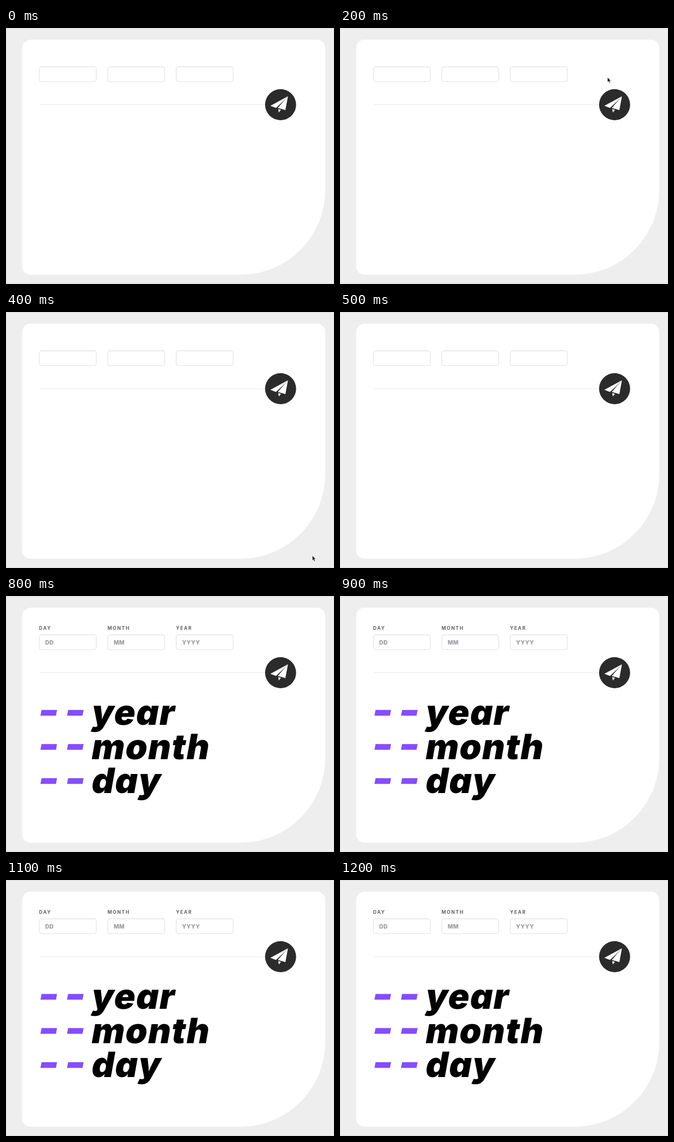
An HTML page for the animation above (1.3 s loop, 600x469 px).

```html
<!DOCTYPE html>
<html lang="en">
<head>
<meta charset="utf-8">
<title>Age calculator</title>
<style>
  html, body { margin: 0; width: 100%; height: 100%; overflow: hidden; background: #eeeeef; }
  svg { display: block; width: 600px; height: 469px; font-family: Inter, "Open Sans", sans-serif; }
  .field { fill: #fff; stroke: #e0e0e0; stroke-width: 1.1; }
  .label { font-size: 8.6px; font-weight: 700; letter-spacing: 1.55px; fill: #626262; }
  .hint { font-size: 10.4px; font-weight: 800; letter-spacing: .4px; fill: #9b9a9f; }
  .unit { font-size: 64px; font-weight: 900; letter-spacing: 1.4px; font-feature-settings: "cv11"; }
  .dash { fill: #854dff; }
  #details, #cursor { opacity: 0; }
</style>
</head>
<body>
<svg viewBox="0 0 600 469" xmlns="http://www.w3.org/2000/svg">
  <rect width="600" height="469" fill="#eeeeef"/>
  <rect x=".5" y=".5" width="599" height="468" fill="none" stroke="#dfdfdf"/>
  <path fill="#fff" d="M44.5 21.5H569a15 15 0 0 1 15 15V297a155 155 0 0 1-155 155H44.5a15 15 0 0 1-15-15V36.5a15 15 0 0 1 15-15Z"/>
  <g id="fields"></g>
  <path d="M61 140.5H476" stroke="#e9e9e9"/>
  <circle cx="502.3" cy="140.5" r="28.4" fill="#2b2b2b"/>
  <g fill="#fff">
    <path d="M515.8 125 483.6 142.6 493.8 146.4 507.2 134Z"/>
    <path d="M515.8 125 511 150.4 497.2 146.6 508 134Z"/>
    <path d="M498 148.4 503 149.9 499 154.8Z"/>
  </g>
  <g id="details"></g>
  <g id="cursor">
    <path d="M.3 .3V9.2L2.3 7.4 3.8 11 5.4 10.3 3.9 6.9H6.6Z" fill="#111" stroke="#fff" stroke-width=".6"/>
  </g>
</svg>
<script>
  const LOOP = 1300;
  const byId = id => document.getElementById(id);

  function add(parent, tag, attrs, text = '') {
    const node = document.createElementNS('http://www.w3.org/2000/svg', tag);
    for (const key in attrs) node.setAttribute(key, attrs[key]);
    node.textContent = text;
    parent.appendChild(node);
  }

  const fields = byId('fields');
  const details = byId('details');

  [['DAY', 'DD'], ['MONTH', 'MM'], ['YEAR', 'YYYY']].forEach(([label, hint], i) => {
    const x = 61 + i * 125.2;
    add(fields, 'rect', { class: 'field', x, y: 71.1, width: 104.2, height: 27.2, rx: 4 });
    add(details, 'text', { class: 'label', x: x - .4, y: 62.2 }, label);
    add(details, 'text', { class: 'hint', x: x + 10.7, y: 88.6 }, hint);
  });

  ['year', 'month', 'day'].forEach((unit, i) => {
    const y = 236 + i * 62.5;
    for (const x of [63, 111.6]) {
      add(details, 'path', { class: 'dash', d: `M${x} ${y - 16.8}l2-10.4h28.4l-2 10.4Z` });
    }
    add(details, 'text', { class: 'unit', transform: `translate(153.8 ${y}) skewX(-10)` }, unit);
  });

  // Each step is [start in ms, style], held until the next one.
  function play(node, steps) {
    const frames = steps.map(([at, style]) => ({ ...style, offset: at / LOOP, easing: 'step-end' }));
    frames.push({ ...steps[steps.length - 1][1], offset: 1 });
    node.animate(frames, { duration: LOOP, iterations: Infinity });
  }

  const cursorAt = (x, y) => ({ opacity: 1, transform: `translate(${x}px, ${y}px)` });
  const away = { opacity: 0, transform: 'translate(0px, 0px)' };

  play(byId('cursor'), [
    [0, away],
    [200, cursorAt(489, 90)],
    [300, cursorAt(548, 390)],
    [400, cursorAt(560, 446)],
    [500, away]
  ]);
  play(details, [[0, { opacity: 0 }], [800, { opacity: 1 }]]);
</script>
</body>
</html>
```
